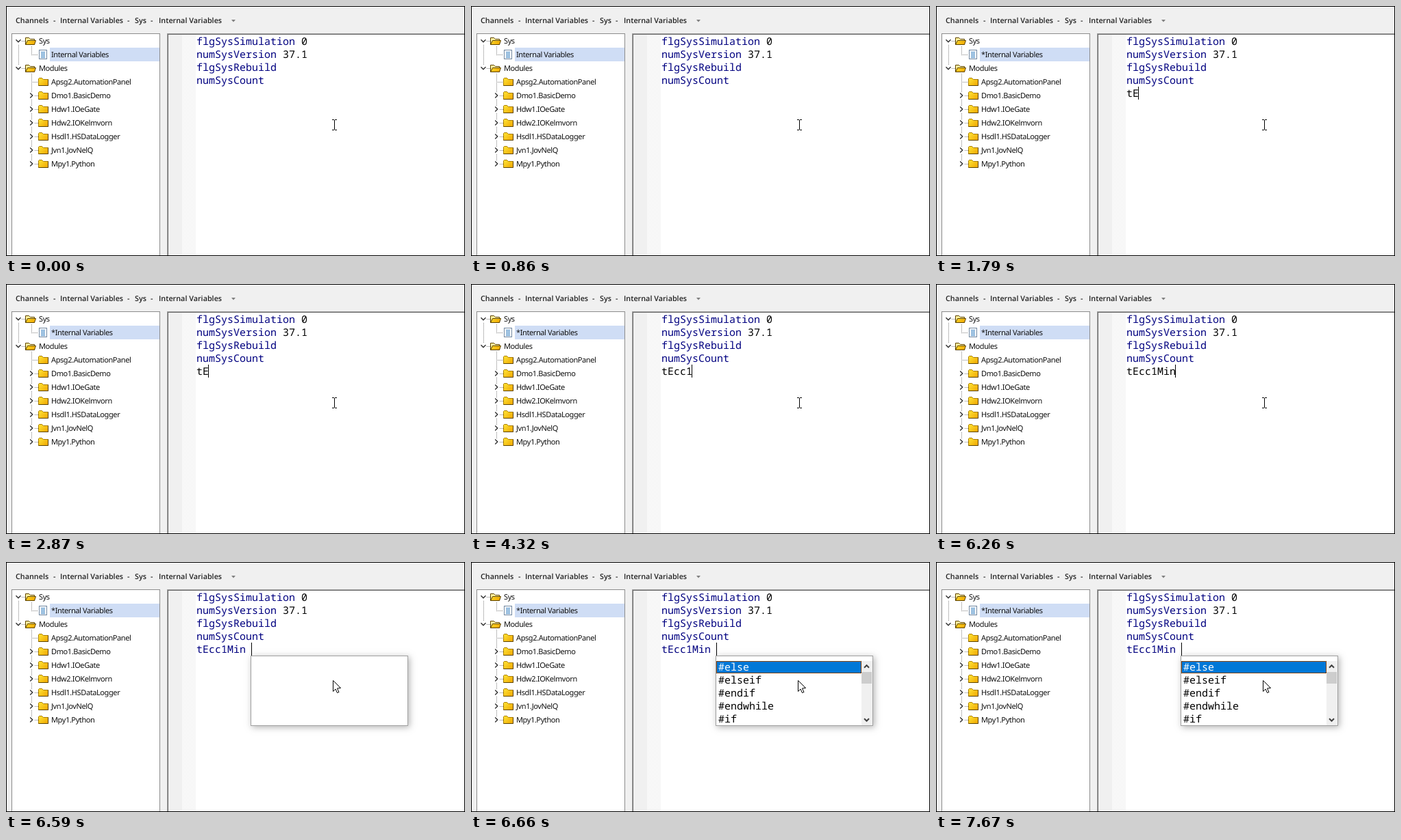
An HTML page with a canvas that plays this animation: 670x366 px, repeating every 8000 ms.

```html
<!DOCTYPE html>
<html lang="en">
<head>
<meta charset="utf-8">
<title>Internal Variables</title>
<style>
html, body { margin: 0; width: 100%; height: 100%; overflow: hidden; background: #f0f0f0; }
canvas { display: block; width: 670px; height: 366px; }
</style>
</head>
<body>
<canvas id="stage" width="670" height="366"></canvas>
<script>
const ctx = document.getElementById('stage').getContext('2d');
const LOOP = 8000;
const NAVY = '#000080', BLACK = '#000000', OUTLINE = '#5c4300';
const CODE_FONT = '15px "Noto Sans Mono", monospace';
const TREE_FONT = '11px "Noto Sans", sans-serif';
const TITLE_FONT = '600 10.8px "Open Sans", sans-serif';
const CODE_X = 278, CHAR_W = 9, LINE_H = 19;
const TYPED = 'tEcc1Min ';
const POPUP_AT = 6590, ITEMS_AT = 6660;

// [start ms, typed characters, caret shown]
const STEPS = [
  [0, 0, 0], [330, 0, 1], [860, 0, 0],
  [1060, 1, 1], [1590, 1, 0],
  [1790, 2, 1], [2340, 2, 0], [2870, 2, 1],
  [3200, 3, 1], [3600, 4, 1], [4060, 4, 0],
  [4320, 5, 1], [4870, 5, 0], [5400, 5, 1],
  [5860, 6, 1], [6130, 7, 1], [6260, 8, 1],
  [6590, 9, 1], [7120, 9, 0], [7670, 9, 1]
];

const CODE = [['flgSysSimulation', '0'], ['numSysVersion', '37.1'], ['flgSysRebuild', ''], ['numSysCount', '']];
const MODULES = ['Apsg2.AutomationPanel', 'Dmo1.BasicDemo', 'Hdw1.IOeGate', 'Hdw2.IOKelmvorn',
  'Hsdl1.HSDataLogger', 'Jvn1.JovNelQ', 'Mpy1.Python'];
const KEYWORDS = ['#else', '#elseif', '#endif', '#endwhile', '#if'];
const TITLE = [['Channels', 14], ['-', 69], ['Internal Variables', 79], ['-', 177],
  ['Sys', 188], ['-', 211], ['Internal Variables', 223]];

function rect(x, y, w, h, color) {
  ctx.fillStyle = color;
  ctx.fillRect(x, y, w, h);
}

function frame(x, y, w, h, color) {
  ctx.strokeStyle = color;
  ctx.lineWidth = 1;
  ctx.strokeRect(x + 0.5, y + 0.5, w - 1, h - 1);
}

function text(str, x, y, font, color, spacing = 0) {
  ctx.font = font;
  ctx.letterSpacing = spacing + 'px';
  ctx.fillStyle = color;
  ctx.fillText(str, x, y);
}

function shape(points, fill, stroke, width = 1) {
  ctx.beginPath();
  points.forEach(([x, y]) => ctx.lineTo(x, y));
  if (fill) {
    ctx.closePath();
    ctx.fillStyle = fill;
    ctx.fill();
  }
  if (stroke) {
    ctx.strokeStyle = stroke;
    ctx.lineWidth = width;
    ctx.stroke();
  }
}

function dots(x, y, length, vertical, color = '#808080') {
  for (let i = 0; i < length; i += 2) {
    rect(x + (vertical ? 0 : i), y + (vertical ? i : 0), 1, 1, color);
  }
}

function chevron(x, y, dx, dy, size, color, width) {
  const ends = dx ? [[x - dx * size / 2, y - size], [x + dx * size / 2, y], [x - dx * size / 2, y + size]]
                  : [[x - size, y - dy * size / 2], [x, y + dy * size / 2], [x + size, y - dy * size / 2]];
  shape(ends, null, color, width);
}

function gold(x, y) {
  const g = ctx.createLinearGradient(x, y - 6, x + 13, y + 6);
  g.addColorStop(0, '#ffe83c');
  g.addColorStop(1, '#f0a800');
  return g;
}

function closedFolder(x, y) {
  shape([[x + .5, y + 5.5], [x + .5, y - 4.5], [x + 1.5, y - 5.5], [x + 5.5, y - 5.5],
    [x + 7.5, y - 3.5], [x + 14.5, y - 3.5], [x + 14.5, y + 5.5]], gold(x, y), '#a87c00');
  shape([[x + .5, y + 5.5], [x + 14.5, y + 5.5], [x + 14.5, y - 3.5]], null, OUTLINE);
}

function openFolder(x, y) {
  shape([[x + .5, y + 5.5], [x + .5, y - 4.5], [x + 5.5, y - 4.5], [x + 7.5, y - 2.5],
    [x + 13.5, y - 2.5], [x + 13.5, y + 5.5]], '#fff0a0', OUTLINE);
  shape([[x + .5, y + 5.5], [x + 3.5, y - .5], [x + 15.5, y - .5], [x + 13.5, y + 5.5], [x + .5, y + 5.5]],
    gold(x, y), OUTLINE);
}

function documentIcon(x, y) {
  rect(x, y, 12, 14, '#ffffff');
  frame(x, y, 12, 14, '#6f86a0');
  for (let i = 0; i < 5; i++) rect(x + 3, y + 3 + i * 2, 6, 1, '#3f86c4');
}

function label(str, x, y) {
  text(str, x, y + 4, TREE_FONT, '#101010', -0.4);
}

function drawTree(modified) {
  rect(8, 40, 217, 326, '#ffffff');
  frame(8, 40, 217, 330, '#8c8c8c');
  rect(64, 61, 160, 20, '#cfddf5');

  dots(18, 57, 30, true);
  dots(37, 59, 13, true);
  dots(37, 71, 9, false);
  dots(37, 99, 133, true);
  [['Sys', 51], ['Modules', 91]].forEach(([name, y]) => {
    dots(23, y, 5, false);
    chevron(18, y, 0, 1, 3.5, '#303030', 1.4);
    openFolder(28, y);
    label(name, 48, y);
  });

  documentIcon(48, 64);
  label((modified ? '*' : '') + 'Internal Variables', 66, 71);

  MODULES.forEach((name, i) => {
    const y = 111 + i * 20;
    if (i) {
      rect(33, y - 5, 8, 11, '#ffffff');
      chevron(37, y, 1, 0, 3.5, '#303030', 1.4);
    }
    dots(i ? 42 : 37, y, i ? 5 : 9, false);
    closedFolder(47, y);
    label(name, 66, y);
  });
}

function drawEditor(count, caret, resolved) {
  rect(235, 40, 435, 326, '#ffffff');
  rect(235, 40, 435, 1, '#a0a0a0');
  rect(235, 40, 1, 326, '#a0a0a0');
  rect(236, 41, 434, 1, '#696969');
  rect(236, 41, 1, 325, '#696969');
  rect(237, 42, 20, 324, '#f0f0f0');
  rect(257, 42, 20, 324, checker);

  CODE.forEach(([name, value], i) => {
    const y = 57 + i * LINE_H;
    text(name, CODE_X, y, CODE_FONT, NAVY);
    text(value, CODE_X + (name.length + 1) * CHAR_W, y, CODE_FONT, BLACK);
  });
  text(TYPED.slice(0, count), CODE_X, 133, CODE_FONT, resolved ? NAVY : BLACK);
  if (caret) rect(Math.max(CODE_X, CODE_X - 1 + count * CHAR_W), 118, 1, 19, BLACK);
}

// Focus outline: alternating orange and black pixels.
function focusRect(x, y, w, h) {
  const orange = '#ff8728';
  frame(x, y, w, h, BLACK);
  dots(x, y, w, false, orange);
  dots(x + 1, y + h - 1, w - 1, false, orange);
  dots(x, y, h, true, orange);
  dots(x + w - 1, y + 1, h - 1, true, orange);
}

function drawPopup(filled) {
  ctx.save();
  ctx.shadowColor = 'rgba(0,0,0,.3)';
  ctx.shadowBlur = 9;
  ctx.shadowOffsetX = ctx.shadowOffsetY = 2;
  rect(357, 137, 230, 103, '#ffffff');
  ctx.restore();
  frame(357, 137, 230, 103, '#a0a0a0');
  if (!filled) return;

  rect(358, 145, 212, 18, '#0078d7');
  focusRect(358, 145, 212, 18);
  KEYWORDS.forEach((word, i) =>
    text(word, 361, 159 + i * LINE_H, CODE_FONT, i ? BLACK : '#ffffff'));

  rect(570, 145, 16, 94, '#f0f0f0');
  rect(570, 161, 15, 17, '#cdcdcd');
  chevron(577.5, 153, 0, -1, 3.5, '#404040', 2);
  chevron(577.5, 231, 0, 1, 3.5, '#404040', 2);
}

function drawTextCursor() {
  rect(479, 167, 1, 14, BLACK);
  [166, 181].forEach(y => {
    rect(476, y, 3, 1, BLACK);
    rect(480, y, 3, 1, BLACK);
  });
}

function drawArrowCursor() {
  shape([[477.5, 173.5], [477.5, 189.5], [481, 186], [483.5, 191.5], [486, 190.5],
    [483.5, 185], [488.5, 184.5], [477.5, 173.5]], '#ffffff', BLACK);
}

function makeChecker() {
  const tile = document.createElement('canvas');
  tile.width = tile.height = 2;
  const c = tile.getContext('2d');
  c.fillStyle = '#ffffff';
  c.fillRect(0, 0, 2, 2);
  c.fillStyle = '#f0f0f0';
  c.fillRect(0, 0, 1, 1);
  c.fillRect(1, 1, 1, 1);
  return ctx.createPattern(tile, 'repeat');
}

const checker = makeChecker();
ctx.textRendering = 'geometricPrecision';

function draw(now) {
  const t = now % LOOP;
  const [, count, caret] = STEPS.findLast(([start]) => t >= start);
  const popup = t >= POPUP_AT;

  rect(0, 0, 670, 366, '#f0f0f0');
  TITLE.forEach(([str, x]) => text(str, x, 25, TITLE_FONT, '#222222'));
  shape([[329, 20], [335, 20], [332, 23.5]], '#808080');

  drawTree(count > 0);
  drawEditor(count, caret, popup);
  if (popup) {
    drawPopup(t >= ITEMS_AT);
    drawArrowCursor();
  } else {
    drawTextCursor();
  }
  frame(0, 0, 670, 366, BLACK);
}

let startTime;
function tick(now) {
  startTime ??= now;
  draw(now - startTime);
  requestAnimationFrame(tick);
}
requestAnimationFrame(tick);
</script>
</body>
</html>
```
